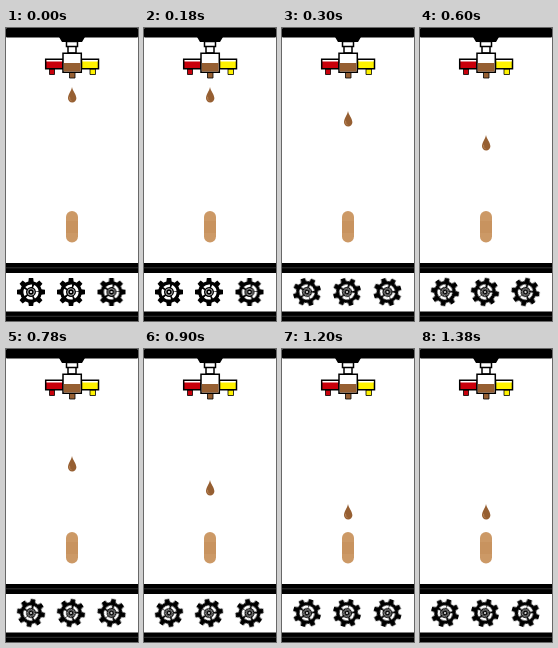
Animation of 132x293 px, one loop 1500 ms. Source, as an HTML page:

```html
<!DOCTYPE html>
<html lang="en">
<head>
<meta charset="utf-8">
<title>Drop dispenser</title>
<style>
  html, body { margin: 0; width: 100%; height: 100%; overflow: hidden; background: #fff; }
  svg { display: block; width: 132px; height: 293px; }
  .drop { animation: fall 1.5s steps(5) infinite; }
  .gear { animation: turn 1.5s steps(5) infinite; }
  @keyframes fall { to { transform: translateY(120px); } }
  @keyframes turn { to { transform: rotate(360deg); } }
</style>
</head>
<body>
<svg viewBox="0 0 132 293">
  <defs>
    <g id="gear">
      <circle r="10.8"/>
      <g id="teeth">
        <path id="tooth" d="M-2.7-10 L-2.2-14 H2.2 L2.7-10Z"/>
        <use href="#tooth" transform="rotate(90)"/>
        <use href="#tooth" transform="rotate(180)"/>
        <use href="#tooth" transform="rotate(270)"/>
      </g>
      <use href="#teeth" transform="rotate(45)"/>
      <circle r="6.3" fill="none" stroke="#fff" stroke-width="2.6" stroke-dasharray="6.2 1.717"/>
      <circle r="3.3" fill="none" stroke="#fff" stroke-width=".7"/>
      <circle r="1.1" fill="#fff"/>
    </g>
    <g id="belt">
      <rect width="132" height="10"/>
      <path d="M0 4.8H132" stroke="#555" stroke-width=".6"/>
    </g>
  </defs>

  <rect width="132" height="9.5" rx="1"/>
  <path d="M53 9H79L76 14H56Z"/>

  <g stroke="#000" stroke-width="1.5">
    <path d="M60.5 13.5H71.5V18.5H60.5Z M62 18.5H70V25H62Z" fill="#fff"/>

    <path d="M43.5 41H48.5V46.5H43.5Z" fill="#c9000b" stroke-width=".8"/>
    <path d="M39.7 31.2H57V40.8H39.7Z" fill="#c9000b"/>
    <path d="M40.5 32H56.5V33.5H40.5Z" fill="#fff" stroke="none"/>

    <path d="M84 41H89.5V46.5H84Z" fill="#fff200" stroke-width=".8"/>
    <path d="M75.5 31.2H92.5V40.8H75.5Z" fill="#fff200"/>
    <path d="M76.5 32H91.7V33.5H76.5Z" fill="#fff" stroke="none"/>

    <path d="M63.5 44H69V50H63.5Z" fill="#965f32" stroke-width=".8"/>
    <path d="M57 25.3H75.3V44.2H57Z" fill="#fff"/>
    <path d="M57.8 35H74.5V43.5H57.8Z" fill="#965f32" stroke="none"/>
  </g>

  <g class="drop">
    <path d="M66 59C65.3 63 62 66.5 62 70.3A4.2 4.2 0 0 0 70.4 70.3C70.4 66.5 66.7 63 66 59Z" fill="#965f32"/>
    <path d="M63.5 69.2Q63.2 72 65.2 73" fill="none" stroke="#bd8a5c" stroke-width=".9" stroke-linecap="round"/>
  </g>

  <rect x="60" y="183" width="12" height="31.5" rx="6" fill="#cc9966"/>
  <rect x="60" y="193" width="12" height="12" fill="#c8935f"/>

  <use href="#belt" y="235"/>
  <use href="#belt" y="283.5"/>

  <g transform="translate(25 264)"><use class="gear" href="#gear"/></g>
  <g transform="translate(65 264)"><use class="gear" href="#gear"/></g>
  <g transform="translate(105.5 264)"><use class="gear" href="#gear"/></g>
</svg>
</body>
</html>
```
